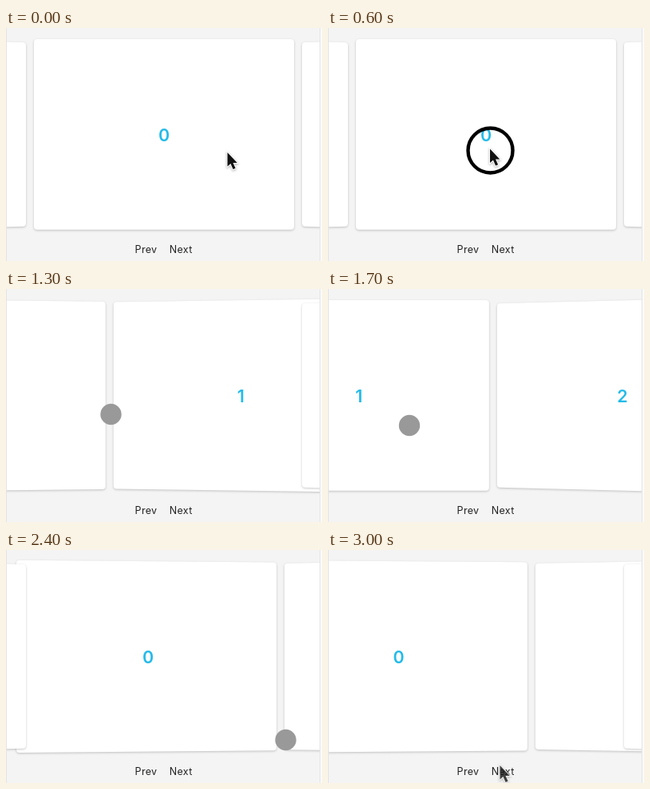
These frames come from a looping animation (396 px wide and 292 px high, 3.1 s). An HTML page with a canvas:

```html
<!DOCTYPE html>
<html lang="en">
<head>
<meta charset="utf-8">
<title>Card carousel</title>
<style>
  html, body { margin: 0; width: 100%; height: 100%; overflow: hidden; background: #f4f4f4; }
  canvas { display: block; width: 396px; height: 292px; }
</style>
</head>
<body>
<canvas id="stage" width="396" height="292"></canvas>
<script>
const ctx = document.getElementById('stage').getContext('2d');
const LOOP = 3100, STEP = 100;
const CENTER = { x: 198, y: 133.4 };
const HALF_W = 163, HALF_H = 119.3, SPACING = 330;
const DRAG_GAIN = 1.56, SPRING = 0.0182, TURN_TIME = 180;

const START = { x: 278, y: 158 };
const MOVES = [
  { from: 100, until: 600, x: 203.5, y: 153.5 },
  { from: 600, until: 1300, x: 131.5, y: 157 },
  { from: 1300, until: 1500, x: 204, y: 171 },
  { from: 1500, until: 1700, x: 102, y: 171 },
  { from: 1700, until: 2200, x: 324, y: 171 },
  { from: 2200, until: 2400, x: 350.5, y: 238 },
  { from: 2400, until: 2800, x: 216, y: 272 }
];

// A swipe pressed and released at the same moment is a button click.
const SWIPES = [
  { press: 600, release: 1195, from: 0, to: 1 },
  { press: 1500, release: 2210, from: 1, to: 0 },
  { press: 2935, release: 2935, from: 0, to: 1 }
];

const ease = k => (1 - Math.cos(Math.PI * Math.min(1, Math.max(0, k)))) / 2;
const swipeAt = t => SWIPES.filter(s => t >= s.press).pop();

function pointerAt(t) {
  return MOVES.reduce((p, m) => {
    const k = ease((t - m.from) / (m.until - m.from));
    return { x: p.x + (m.x - p.x) * k, y: p.y + (m.y - p.y) * k };
  }, START);
}

function dragShift(swipe, t) {
  return (pointerAt(t).x - pointerAt(swipe.press).x) * DRAG_GAIN;
}

function row(active, shift) {
  return [-1, 1, 0].map(side => ({ label: active + side, x: shift + side * SPACING, turn: side }));
}

function cardsAt(t) {
  const swipe = swipeAt(t);
  if (!swipe) return row(0, 0);
  const { from, to, release } = swipe;
  if (t < release) return row(from, dragShift(swipe, t));

  // The incoming card springs to the centre while its neighbour is already in place.
  const dir = to - from, age = t - release;
  const swing = (1 + SPRING * age) * Math.exp(-SPRING * age);
  const x = (dir * SPACING + dragShift(swipe, release)) * swing;
  const turn = Math.exp(-age / TURN_TIME);
  return [
    { label: from, x: x - dir * SPACING, turn: dir * (turn - 1) },
    { label: to, x, turn: dir * turn },
    { label: to + dir, x: dir * SPACING, turn: dir }
  ];
}

function roundedPolygon(points, radius) {
  const last = points[points.length - 1], first = points[0];
  ctx.beginPath();
  ctx.moveTo((last[0] + first[0]) / 2, (last[1] + first[1]) / 2);
  points.forEach((p, i) => ctx.arcTo(...p, ...points[(i + 1) % points.length], radius));
  ctx.closePath();
}

function softShadow(alpha) {
  ctx.shadowColor = `rgba(0,0,0,${alpha})`;
  ctx.shadowBlur = 3;
  ctx.shadowOffsetY = 1;
}

function drawCard({ label, x, turn }) {
  const cx = CENTER.x + x, cy = CENTER.y;
  const left = cx - HALF_W + 6 * turn, right = cx + HALF_W + 6 * turn;
  const hl = HALF_H - 4 * turn, hr = HALF_H + 4 * turn;
  ctx.save();
  softShadow(.22);
  ctx.fillStyle = '#fff';
  roundedPolygon([[left, cy - hl], [right, cy - hr], [right, cy + hr], [left, cy + hl]], 4);
  ctx.fill();
  ctx.restore();
  ctx.fillStyle = '#25bbe8';
  ctx.font = '600 21.5px Inter, sans-serif';
  ctx.fillText(label, cx, 141.5);
}

function drawArrow({ x, y }, alpha) {
  ctx.save();
  ctx.translate(x - .5, y - 2);
  ctx.scale(.88, .88);
  ctx.globalAlpha = alpha;
  ctx.beginPath();
  [[0, 0], [0, 20], [4.5, 16], [8, 24], [11.5, 22.5], [8, 14.8], [14, 14.8]]
    .forEach(p => ctx.lineTo(...p));
  ctx.closePath();
  ctx.save();
  softShadow(.35);
  ctx.strokeStyle = '#fff';
  ctx.lineWidth = 2.2;
  ctx.stroke();
  ctx.restore();
  ctx.fillStyle = '#111';
  ctx.fill();
  ctx.restore();
}

function drawCircle({ x, y }, radius) {
  ctx.beginPath();
  ctx.arc(x, y, radius, 0, Math.PI * 2);
}

function drawPointer(t) {
  const pointer = pointerAt(t), swipe = swipeAt(t);
  const clicked = swipe && swipe.press === swipe.release;
  const held = swipe && !clicked && t < swipe.release + 250;
  const ring = held && (t < swipe.press + STEP || (t < swipe.release && t > swipe.release - 120));
  if (held && !ring) {
    drawCircle(pointer, 13.2);
    ctx.fillStyle = '#999';
    ctx.fill();
    return;
  }
  if (ring) {
    drawCircle(pointer, 28);
    ctx.strokeStyle = '#000';
    ctx.lineWidth = 4.4;
    ctx.stroke();
  }
  drawArrow(pointer, clicked ? .78 : 1);
}

function draw(t) {
  ctx.fillStyle = '#f4f4f4';
  ctx.fillRect(0, 0, 396, 292);
  ctx.textAlign = 'center';
  ctx.save();
  ctx.beginPath();
  ctx.rect(1, 0, 392, 292);
  ctx.clip();
  cardsAt(t).forEach(drawCard);
  ctx.restore();

  ctx.fillStyle = '#e4e4e4';
  ctx.fillRect(0, 0, 1, 292);
  ctx.fillRect(393, 0, 1, 292);
  ctx.fillStyle = '#fafafa';
  ctx.fillRect(394, 0, 2, 292);

  ctx.fillStyle = '#222';
  ctx.font = '12.5px Inter, sans-serif';
  ctx.letterSpacing = '0.3px';
  ctx.fillText('Prev', 175.5, 282);
  ctx.fillText('Next', 219.2, 282);
  ctx.letterSpacing = '0px';
  drawPointer(t);
}

function frame() {
  const t = performance.now() % LOOP;
  draw(Math.floor(t / STEP) * STEP);
  requestAnimationFrame(frame);
}
frame();
</script>
</body>
</html>
```
